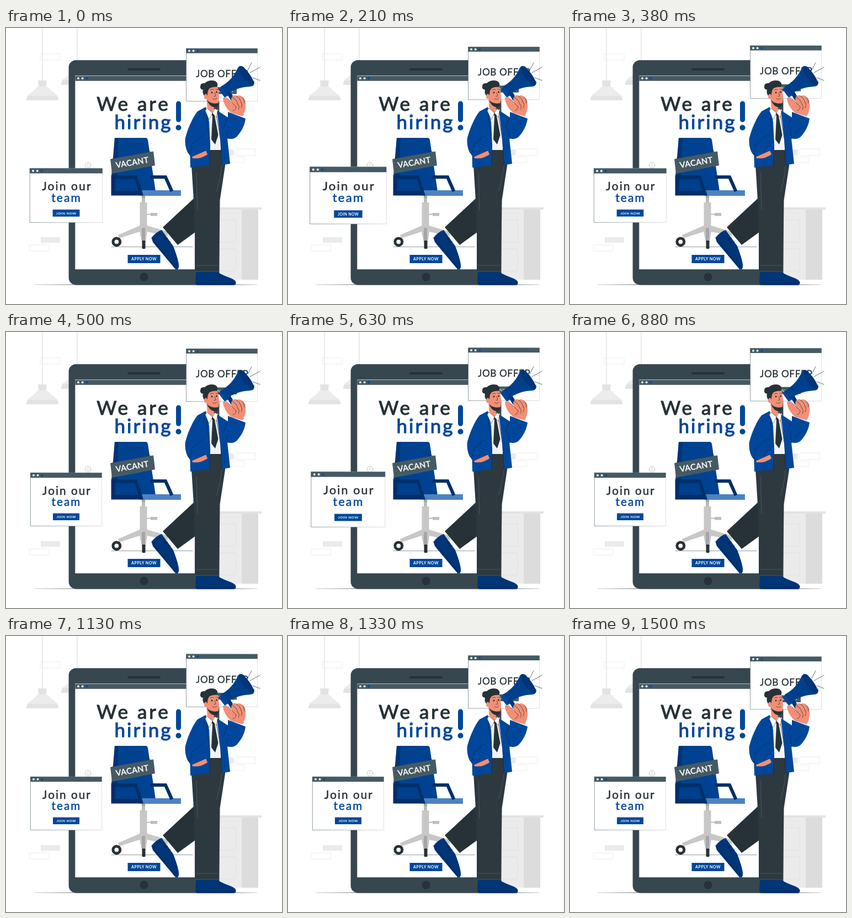
Animation of 500 by 500 pixels, one loop 1.54 s. Source, as an HTML page:

```html
<!DOCTYPE html>
<html lang="en">
<head>
<meta charset="utf-8">
<title>We are hiring</title>
<style>
  html, body { margin: 0; height: 100%; overflow: hidden; background: #fff; }
  svg { display: block; width: 100vw; height: 100vh; }
  text { font-family: Lato, sans-serif; text-anchor: middle; stroke-linejoin: round; }
  .dark { fill: #37474f; }
  .bar { fill: #455a64; }
  .ink { fill: #263238; }
  .blue { fill: #00479b; }
  .navy { fill: #003577; }
  .skin { fill: #f28f76; }
  .pale { fill: #e3e3e3; }
  .paper { fill: #fff; stroke: url(#edge); stroke-width: .6; }
  .line { fill: none; stroke: #263238; stroke-width: .7; stroke-linecap: round; stroke-linejoin: round; }
  .ghost { fill: none; stroke: #e6e6e6; stroke-width: .7; }
  .title { font-size: 35px; letter-spacing: 4px; stroke-width: 1.1px; }
  .head { font-size: 20.6px; letter-spacing: 2.1px; stroke-width: .5px; }
  .inkText { fill: #263238; stroke: #263238; }
  .blueText { fill: #00479b; stroke: #00479b; }
  .label { fill: #fff; font-weight: 700; letter-spacing: .45px; }
</style>
</head>
<body>
<svg viewBox="0 0 500 500">
  <defs>
    <g id="lamp">
      <path d="M66 0V95" stroke="#d5d5d5" fill="none"/>
      <path class="pale" d="M58 95H74L73 106H59Z"/>
      <path d="M59 106H73Q77 107 80 112L94 123H38L52 112Q55 107 59 106Z" fill="#ececec"/>
      <path class="pale" d="M40 123H92Q95 124 95 131H37Q37 124 40 123Z"/>
    </g>
    <g id="dots">
      <circle r="1.9" fill="#fff"/>
      <circle cx="7.6" r="1.9" fill="#fff"/>
      <circle cx="15.2" r="1.9" class="blue"/>
    </g>
    <linearGradient id="fade">
      <stop offset="0" stop-color="#263238" stop-opacity=".25"/>
      <stop offset=".25" stop-color="#263238"/>
      <stop offset=".85" stop-color="#263238"/>
      <stop offset="1" stop-color="#263238" stop-opacity=".25"/>
    </linearGradient>
    <linearGradient id="edge">
      <stop offset="0" stop-color="#455a64"/>
      <stop offset="1" stop-color="#c5cdd1"/>
    </linearGradient>
  </defs>

  <!-- room -->
  <use href="#lamp"/>
  <use href="#lamp" x="63" y="-28"/>
  <path class="ghost" d="M62 47H98V58H62ZM43 393H78V404H43ZM416 219H452V231H416ZM398 234H432V244H398Z"/>
  <path fill="#ebebeb" d="M63 379H98V389H63ZM395 220H413V231H395ZM380 329H428V456H380Z"/>
  <path fill="#dcdcdc" d="M427 329H457V456H427Z"/>
  <path class="pale" d="M380 325H463V329H380Z"/>
  <path class="ghost" style="stroke:#dcdcdc" d="M380 347H416V388H380M380 400H416V440H380"/>
  <rect x="50" y="464.5" width="405" height=".9" fill="url(#fade)"/>

  <!-- tablet -->
  <rect class="dark" x="113.6" y="58.2" width="272.8" height="407.2" rx="13"/>
  <rect x="125.3" y="86.2" width="249.4" height="351" fill="#fff"/>
  <rect class="bar" x="125.3" y="86.8" width="249.4" height="9"/>
  <use href="#dots" x="131" y="91.2"/>
  <rect class="ink" x="220" y="72.8" width="60" height="4.2" rx="2"/>
  <circle class="ink" cx="250" cy="451" r="7.5"/>
  <g class="line" style="stroke:#aaa">
    <circle cx="148.5" cy="248.5" r="5.2"/>
    <path d="M149.8 246L147 248.5L149.8 251"/>
  </g>
  <text class="title inkText" x="231" y="150">We are</text>
  <text class="title blueText" x="249" y="183" style="letter-spacing:3px">hiring</text>
  <path d="M312.5 137V166" stroke="#00479b" stroke-width="9" stroke-linecap="round"/>
  <circle class="blue" cx="312.5" cy="180.5" r="5"/>
  <rect class="blue" x="220.5" y="411" width="59" height="15"/>
  <text class="label" x="250" y="421.3" font-size="7.2">APPLY NOW</text>

  <!-- chair -->
  <path class="line" style="stroke-width:.5" d="M191 396.5H338"/>
  <path fill="#bdbdbd" d="M246 304H252V316H246ZM255 336.500H264V338.500H255ZM262 335H274V340.500H262Z"/>
  <path fill="#c7c7c7" d="M242.500 316H255.500V358L293 369V377L256 369L253 388H246L242 369L205 381L203 375L242.500 358Z"/>
  <path fill="#a6a6a6" d="M246 304H252V308H246ZM246 362H252V388H246Z"/>
  <circle cx="200.3" cy="387.3" r="6.4" fill="#fff" stroke="#263238" stroke-width="5"/>
  <rect class="ink" x="246.500" y="385" width="6" height="15" rx="1.500"/>
  <path fill="#004292" d="M197 199H253Q256 199 257 203L271 296H191Z"/>
  <path class="navy" d="M197 199H204L201 268H191Z"/>
  <path fill="#4d82c2" d="M243 294H317V304H243Z"/>
  <path fill="#002f69" d="M190.500 267H237L249 303.500H190.500Z"/>
  <path fill="#003f8c" d="M198 273.500H233L240 295H197Z"/>
  <path fill="none" stroke="#002f69" stroke-width="6" d="M262 270H289L300.500 296"/>
  <path class="line" d="M191 239L222 206M222 206L265 226"/>
  <path class="bar" d="M189 237.500L267 223.500L270 249L192 264Z"/>
  <text class="label" transform="translate(229.500 248.600) rotate(-9.500)" font-size="14.500" style="font-weight:400;stroke:#fff;stroke-width:.5px">VACANT</text>

  <!-- floating window -->
  <g id="offer">
    <path class="paper" d="M326.5 37.5H455.5V133H326.5Z"/>
    <rect class="bar" x="326.3" y="37.3" width="129.4" height="8.7"/>
    <use href="#dots" x="332" y="41.8"/>
    <text class="inkText" x="392" y="89.5" font-size="17.2" letter-spacing=".6" stroke-width=".35">JOB OFFER</text>
    <rect class="bar" x="366" y="107.5" width="52" height="12.5"/>
    <text class="label" x="392" y="116.2" font-size="6.4">APPLY NOW</text>
  </g>

  <!-- man: legs and shoes -->
  <path class="ink" d="M337 246L341 308L284 361L311 393L344 369L360 300Z"/>
  <path class="navy" d="M263.500 380Q272 369 282 366L303 395C308 408 314 426 313 433Q312 439 307 437L266 388Z"/>
  <path class="line" style="stroke:#001f4a" d="M264.500 381L307 434M286 383L293 380M290 389L298 387"/>
  <path fill="#2d393f" d="M336 248L367 221H391L397.500 246L387.500 312L386 440H342L342 345Z"/>
  <path class="line" style="stroke:#56646b" d="M391 250Q386 285 381 296M345 262L347 330M344 430H385"/>
  <path class="navy" d="M344 442H384C393 450 411 452 416 459Q418 466 412 466H346Q343 465 343 458Z"/>
  <path class="line" style="stroke:#001f4a" d="M344 462H416M386 444L381 449M391 447L386 452"/>

  <!-- man: shirt, tie, jacket -->
  <path fill="#f3f3f3" d="M364 146L384 148L390 221H369Z"/>
  <path class="ink" d="M371 153L377 152L378 159L384.500 194L379 211L372 202L374 160Z"/>
  <path class="blue" d="M362 143L347 151C337 163 328 186 324.500 201Q324 222 333.500 231L334 253L369 248L370 212L368 170Z"/>
  <path class="blue" d="M382 149L402 162L402 152L434 164C432 178 426 188 418 197Q411 203 401 200L406 246L391 248L388 200Z"/>
  <path class="line" style="stroke:#002a60" d="M362 151L369 212L369 247M381 157L389 205L391 247M359 194Q349 199 338 210M337 212L333 230M401 162L395 178M402 201L399 186M422 179L407 190"/>
  <path class="skin" d="M337 233L362 222L365 229Q352 238 338 236Z"/>
  <path class="line" d="M337 233L362 222"/>

  <!-- man: head -->
  <path class="skin" d="M363 126L365 148L374 155L379 139Z"/>
  <path fill="#fff" stroke="#263238" stroke-width=".5" d="M364 145L361 150L368 166L374 154ZM379 146L374 154L381 162L383 150Z"/>
  <path class="skin" d="M360 110Q372 101 383 106Q388 124 384.500 137Q378 144 370 139Q361 132 360 110Z"/>
  <path class="ink" d="M364 130Q371 139 385 136Q384 144 378 144Q368 142 364 130Z"/>
  <path class="ink" d="M352 106Q352 99 360 100Q368 93 379 96Q386 101 382 107Q374 106 368 110Q365 114 365 122L360 124Q355 118 357 112Q351 111 352 106Z"/>
  <ellipse class="skin" cx="362" cy="124" rx="3" ry="4.500"/>
  <circle class="ink" cx="373" cy="117" r="1.500"/>
  <circle class="ink" cx="381.500" cy="116" r="1.500"/>
  <path class="line" d="M370 112.500Q373 110 376 111.500M380 111L384 111.500M378 117L380 123L377 124M374 128Q379 131 382 127"/>

  <!-- man: megaphone and hand -->
  <path class="navy" d="M398 116L405 113L414 128L408 132Z"/>
  <path class="blue" d="M385 111L391 105L403 122L396 126Z"/>
  <path fill="#003f8c" d="M389 106Q410 95 420 72Q424 66 431 71L450 98Q450 105 443 106Q418 107 399 121Z"/>
  <ellipse class="navy" cx="435.500" cy="86.500" rx="6.500" ry="21" transform="rotate(-36 435.500 86.500)"/>
  <path class="line" style="stroke:#002a60" d="M401 99L412 115"/>
  <path class="line" d="M438 76L445 63M442 81L460 71M447 90L460 95"/>
  <path class="skin" d="M393 127Q398 122 403 129L410 137Q406 128 410 124Q414 120 418 123Q424 120 428 125Q434 128 434 137Q435 148 429 160L408 154Q394 142 393 127Z"/>
  <path class="line" d="M403 129L417 143M410 126Q417 128 420 138M417 123Q424 127 426 135M427 125Q432 129 432 136M417 143Q416 149 411 150M420 138Q424 142 421 148M426 135Q429 139 426 145"/>

  <!-- pulsing window -->
  <g id="join">
    <path class="paper" d="M44.3 255H173.500V351.500H44.3Z"/>
    <rect class="bar" x="44" y="255" width="129.700" height="9"/>
    <use href="#dots" x="50" y="259.600"/>
    <text class="head inkText" x="110.300" y="294.500">Join our</text>
    <text class="head blueText" x="109.500" y="314.500">team</text>
    <rect class="blue" x="85" y="328.500" width="48" height="12.500"/>
    <text class="label" x="109.200" y="337.100" font-size="6.200">JOIN NOW</text>
  </g>
</svg>
<script>
  const LOOP = 1540, LEAD = 25;
  const offer = document.getElementById('offer');
  const join = document.getElementById('join');

  // Linear ramp up to 1 at `peak`, back to 0 at `end`
  const beat = (t, start, peak, end) =>
    Math.max(0, Math.min((t - start) / (peak - start), (end - t) / (end - peak)));

  function draw() {
    const t = (performance.now() + LEAD) % LOOP;
    const lift = 10 * beat(t, 0, 750, 1500);
    const scale = 1 + 0.1 * (beat(t, 0, 150, 450) + beat(t, 600, 750, 900));
    offer.setAttribute('transform', `translate(0 ${-lift})`);
    join.setAttribute('transform', `translate(108.9 303.2) scale(${scale}) translate(-108.9 -303.2)`);
    requestAnimationFrame(draw);
  }
  draw();
</script>
</body>
</html>
```
